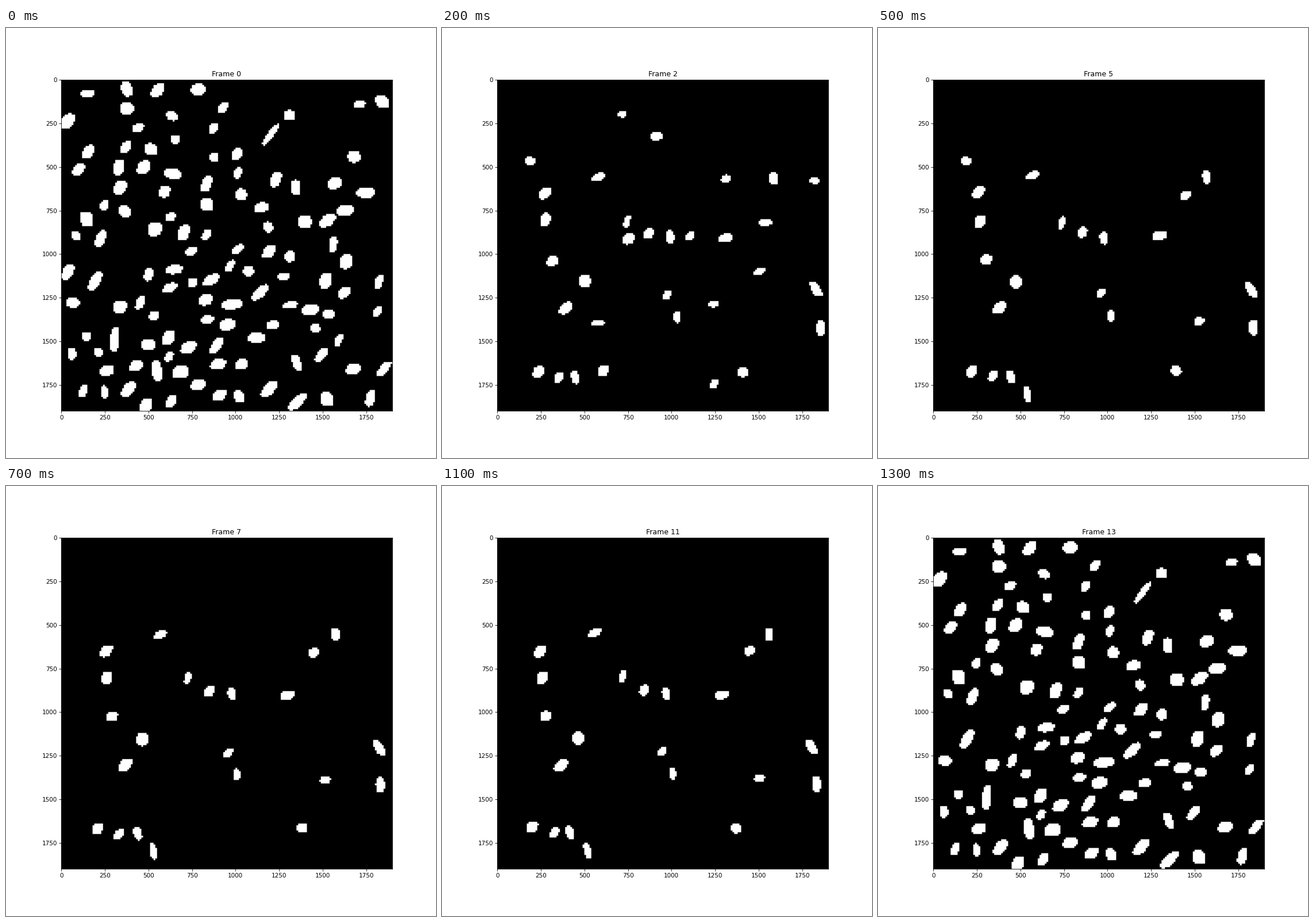
Animation of 748x748 px, one loop 1400 ms. Source, as a matplotlib script:

```python
import numpy as np
import matplotlib.pyplot as plt
from matplotlib.animation import FuncAnimation

SIZE = 748    # stage in pixels
FRAMES = 14
GRID = 190    # cells per side
CELL = 10     # data units per cell

CROWD = 116   # blobs in the opening
LEAVERS = 4   # blobs missing when the crowd returns
PASSERS = 35  # short-lived blobs right after the crowd
DECAY = 0.38  # share of passers left after each frame

# Mean places of the lasting blobs, in cells; the last ones arrive late.
RESIDENTS = np.array([
    (26, 65), (26.5, 81), (29.5, 103), (57, 55), (73, 81), (85, 88),
    (98, 90), (96, 123), (101.5, 136), (38, 131), (22, 167), (34, 170),
    (44, 170), (48, 116), (182.5, 120.5), (184, 142), (139, 167),
    (157, 56), (130, 90), (152, 139), (53, 180), (145.5, 66),
])
LATE, ARRIVAL = 3, 4
DRIFT = np.array([-0.3, -0.1])  # cells per frame
MIDDLE = 6.5                    # frame at which residents are at their mean place

rows, cols = np.mgrid[:GRID, :GRID] + 0.5


def is_sparse(x, y):
    """True in the two nearly bare areas on the right."""
    return (x > 115 and y < 57) or (x > 165 and 65 < y < 115)


def scatter(rng, count, gap, taken=()):
    """Throw darts that keep a gap to each other and to taken places."""
    places = list(taken)
    while len(places) < len(taken) + count:
        x, y = rng.uniform(3, GRID - 3, 2)
        if is_sparse(x, y) and rng.random() > 0.1:
            continue
        if all(np.hypot(x - a, y - b) > gap for a, b in places):
            places.append((x, y))
    return places[len(taken):]


def random_shapes(rng, count, smallest, largest):
    """Width, height and slant of each blob."""
    size = rng.uniform(smallest, largest, count)
    aspect = np.exp(rng.normal(0, 0.2, count))
    slant = rng.normal(-0.15, 0.25, count)
    return np.column_stack([size * aspect, size / aspect, slant])


def make_blobs(seed, count, gap, smallest, largest, taken=()):
    rng = np.random.default_rng(seed)
    places = scatter(rng, count, gap, taken)
    return np.hstack([places, random_shapes(rng, count, smallest, largest)])


crowd = make_blobs(8, CROWD, 10.5, 5, 8.3)
passers = make_blobs(3, PASSERS, 10, 4, 6.5, RESIDENTS)


def resident_blobs(frame):
    rng = np.random.default_rng(frame)
    count = len(RESIDENTS) - (LATE if frame < ARRIVAL else 0)
    sizes = random_shapes(np.random.default_rng(5), len(RESIDENTS), 5, 7)
    places = RESIDENTS + DRIFT * (frame - MIDDLE)
    places = places + rng.normal(0, 0.5, places.shape)
    return np.hstack([places, sizes])[:count]


def blobs_at(frame):
    if frame == 0:
        return crowd
    if frame == FRAMES - 1:
        return crowd[:-LEAVERS]
    staying = round(PASSERS * DECAY ** (frame - 1))
    return np.vstack([resident_blobs(frame), passers[:staying]])


def draw_mask(frame):
    mask = np.zeros((GRID, GRID), np.uint8)
    for x, y, w, h, slant in blobs_at(frame):
        dy = rows - y
        dx = cols - x - slant * dy
        mask |= np.abs(2 * dx / w) ** 2.6 + np.abs(2 * dy / h) ** 2.6 <= 1.05
    return np.kron(mask, np.ones((CELL, CELL), np.uint8))


fig = plt.figure(figsize=(10, 10), dpi=SIZE / 10)
ax = fig.add_axes([96 / SIZE, 82 / SIZE, 576 / SIZE, 576 / SIZE])
image = ax.imshow(draw_mask(0), cmap="gray", vmin=0, vmax=1)
title = ax.set_title("Frame 0")


def update(frame):
    image.set_data(draw_mask(frame))
    title.set_text(f"Frame {frame}")
    return image, title


anim = FuncAnimation(fig, update, frames=FRAMES, interval=100, repeat=True)
plt.show()
```
